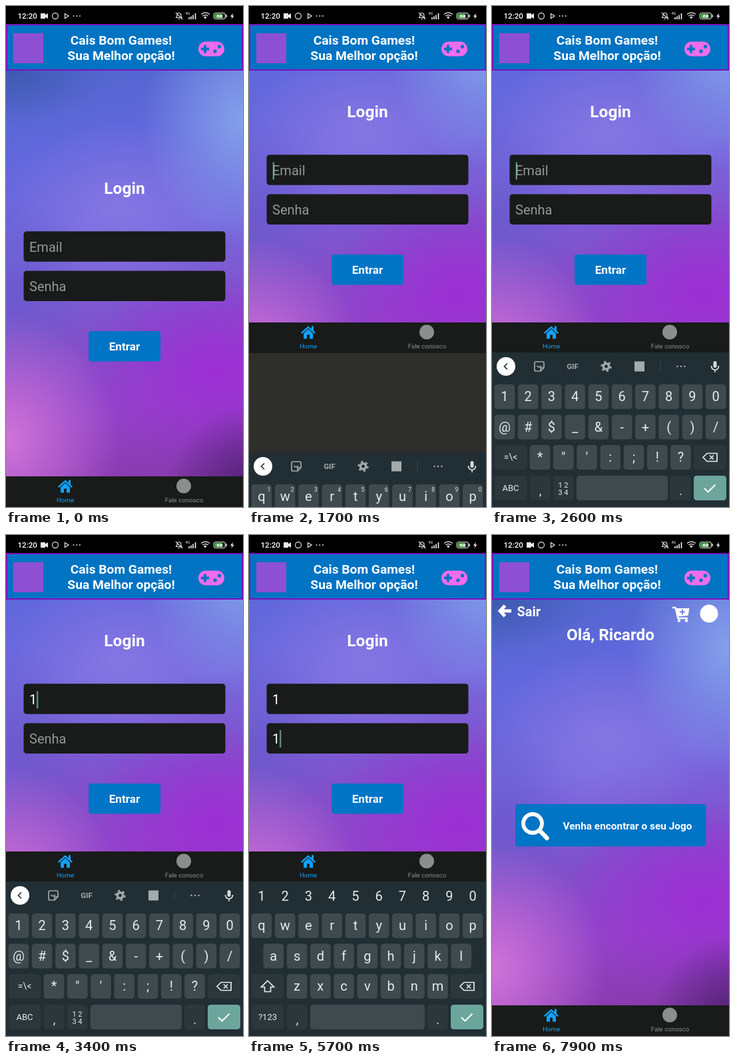
Recreate the animation shown at these times as an HTML page. Size 356x752 px, loop 8000 ms.

```html
<!DOCTYPE html>
<html lang="pt-BR">
<head>
<meta charset="utf-8">
<title>Login</title>
<style>
html, body { margin: 0; width: 100%; height: 100%; overflow: hidden; background: #2e2e2b; }
svg { position: absolute; left: 0; display: block; overflow: visible; }
text { font-family: Roboto, "Noto Sans", sans-serif; fill: #fff; }
.b { font-weight: 700; }
.m { text-anchor: middle; }
.stage { position: absolute; left: 0; top: 0; width: 356px; height: 752px; overflow: hidden; }
.stage, .stage * { animation-duration: 8s; animation-timing-function: step-end; animation-iteration-count: infinite; }

.clip { position: absolute; top: 27px; width: 356px; height: 679px; overflow: hidden; animation-name: clip; }
.page { position: absolute; inset: 0; }
.login { animation-name: login; }
.home { opacity: 0; animation-name: home; }
.bg { position: absolute; top: 70px; left: 0; right: 0; bottom: 0; overflow: hidden; }
.bg::before {
  content: ""; position: absolute; left: 0; width: 100%; height: 609px; top: calc(50% - 304.5px);
  background:
    radial-gradient(150px 80px at 0 0, #3a56a8cc, #3a56a800),
    radial-gradient(150px 190px at 100% 12%, #84a0ea, #84a0ea00),
    radial-gradient(130px 130px at 104% 104%, #4c2070, #4c207000),
    radial-gradient(170px 190px at 0 91%, #cf74d8, #cf74d800),
    radial-gradient(200px 150px at 88% 74%, #9c2ed4, #9c2ed400),
    radial-gradient(110px 150px at 4% 55%, #6656c8aa, #6656c800),
    radial-gradient(170px 130px at 48% 34%, #8d7ae4bb, #8d7ae400),
    linear-gradient(168deg, #4f66cc, #6268dc 20%, #7669de 42%, #824fca 63%, #9244c8 80%, #8638a8);
}
.form { top: calc(50% + 34.5px); }
.ph, .ph text { fill: #969998; }
.cur { fill: #74aea3; opacity: 0; }
.c1 { animation-name: cur1; }
.c2 { animation-name: cur2; }
.ph1 { animation-name: ph1; }
.v1 { opacity: 0; animation-name: v1; }
.ph2 { animation-name: ph2; }
.v2 { opacity: 0; animation-name: v2; }
.dot { opacity: 0; fill: #fff; animation-name: dot; }
.btn { animation-name: press; }

.tabs { top: 0; transform: translateY(706px); animation-name: tabs; }
.kb { top: 520px; transform: translateY(232px); animation-name: kb; }
.kb text { fill: #e6ebec; }
.k { fill: #3e4a4e; }
.d { fill: #2b373b; }
.bar { animation-name: early; }
.pass { opacity: 0; animation-name: late; }
.abc { animation-name: abc; }
.hint { animation-name: hint; }
.sym { opacity: 0; animation-name: sym; }
.st { top: 0; }

@keyframes clip { 0% { height: 679px } 21.25% { height: 448px } 87.5% { height: 679px } }
@keyframes tabs { 0% { transform: translateY(706px) } 21.25% { transform: translateY(475px) } 86.25% { transform: translateY(706px) } }
@keyframes kb {
  0% { transform: translateY(232px) } 21.25% { transform: translateY(150px) }
  22.5% { transform: translateY(38px) } 23.75% { transform: none }
  86.25% { transform: translateY(5px) } 87.5% { transform: translateY(90px) }
  88.75% { transform: translateY(200px) } 90% { transform: translateY(232px) }
}
@keyframes login { 0% { transform: none } 85% { transform: scale(1.03) } 86.25% { transform: scale(1.076) } 87.5% { transform: scale(1.09) } }
@keyframes home {
  0% { opacity: 0; transform: none } 87.5% { opacity: .85; transform: scale(.975) }
  88.75% { opacity: 1; transform: scale(.993) } 90% { opacity: 1; transform: none }
}
@keyframes cur1 {
  0% { opacity: 0; transform: none } 21.25% { opacity: 1; transform: none } 26.25% { opacity: 0; transform: none }
  32.5% { opacity: 1; transform: none } 38.75% { opacity: 1; transform: translateX(10.4px) } 45% { opacity: 0; transform: none }
}
@keyframes cur2 {
  0% { opacity: 0; transform: none } 48.75% { opacity: 1; transform: none } 55% { opacity: 0; transform: none }
  58.75% { opacity: 1; transform: translateX(10.4px) } 65% { opacity: 0; transform: none }
  71.25% { opacity: 1; transform: translateX(10.4px) } 77.5% { opacity: 0; transform: none }
}
@keyframes ph1 { 0% { opacity: 1 } 38.75% { opacity: 0 } }
@keyframes v1 { 0% { opacity: 0 } 38.75% { opacity: 1 } }
@keyframes ph2 { 0% { opacity: 1 } 58.75% { opacity: 0 } }
@keyframes v2 { 0% { opacity: 0 } 58.75% { opacity: 1 } 77.5% { opacity: 0 } }
@keyframes dot { 0% { opacity: 0 } 77.5% { opacity: 1 } }
@keyframes press { 0% { opacity: 1 } 80% { opacity: .5 } 81.25% { opacity: .2 } 83.75% { opacity: .4 } 85% { opacity: .6 } 86.25% { opacity: .8 } }
@keyframes early { 0% { opacity: 1 } 50% { opacity: 0 } }
@keyframes late { 0% { opacity: 0 } 50% { opacity: 1 } }
@keyframes abc { 0% { opacity: 1 } 31.25% { opacity: 0 } 50% { opacity: 1 } }
@keyframes hint { 0% { opacity: 1 } 31.25% { opacity: 0 } }
@keyframes sym { 0% { opacity: 0 } 31.25% { opacity: 1 } 50% { opacity: 0 } }
</style>
</head>
<body>
<svg width="0" height="0">
  <defs>
    <g id="header">
      <rect y="27" width="356" height="70" fill="#7d10bd"/>
      <rect x="2" y="29" width="352" height="66" fill="#0073c3"/>
      <rect x="11" y="41" width="45" height="45" fill="#8e50d2"/>
      <text class="b m" x="173" y="58" font-size="19.200">Cais Bom Games!</text>
      <text class="b m" x="173" y="80.700" font-size="19.200">Sua Melhor opção!</text>
      <rect x="289" y="53.500" width="39" height="22" rx="11" fill="#ef6cec"/>
      <path d="M293 64.500h12M299 58.500v12" stroke="#0073c3" stroke-width="4"/>
      <circle cx="314" cy="68" r="2.700" fill="#0073c3"/>
      <circle cx="320.500" cy="61" r="2.700" fill="#0073c3"/>
    </g>
  </defs>
</svg>

<div class="stage">
  <svg class="tabs" width="356" height="46">
    <rect width="356" height="46" fill="#181b19"/>
    <g fill="#14a0ff">
      <path d="M79.500 15.500 89 7l9.500 8.500" fill="none" stroke="#14a0ff" stroke-width="2.400" stroke-linecap="round"/>
      <path d="M94 5.500h3v7h-3zM82 16.500l7-6.500 7 6.500v8h-5v-6h-4v6h-5z"/>
    </g>
    <circle cx="267" cy="14.500" r="11" fill="#8c8e8d"/>
    <text class="m" x="89" y="38.700" font-size="9.700" style="fill:#14a0ff">Home</text>
    <text class="m" x="267.500" y="38.700" font-size="9.700" style="fill:#8c8e8d">Fale conosco</text>
  </svg>

  <div class="clip">
    <div class="page login">
      <div class="bg"></div>
      <svg width="356" height="679" viewBox="0 27 356 679"><use href="#header"/></svg>
      <svg class="form" width="356" height="1">
        <text class="b m" x="178" y="-119" font-size="24.500">Login</text>
        <rect x="26.500" y="-62.800" width="303" height="45.500" rx="4.500" fill="#181b19"/>
        <rect x="26.500" y="-3.500" width="303" height="45.500" rx="4.500" fill="#181b19"/>
        <g font-size="20">
          <text class="ph ph1" x="35" y="-32.500">Email</text>
          <text class="v1" x="35" y="-32.500">1</text>
          <text class="ph ph2" x="35" y="26.500">Senha</text>
          <text class="v2" x="35" y="26.500">1</text>
        </g>
        <circle class="dot" cx="38.700" cy="19.500" r="2.500"/>
        <rect class="cur c1" x="35.800" y="-51.500" width="1.900" height="26"/>
        <rect class="cur c2" x="35.800" y="7" width="1.900" height="26"/>
        <g class="btn">
          <rect x="124" y="87" width="108" height="45.500" rx="4" fill="#0074c5"/>
          <text class="b m" x="178" y="116.300" font-size="17.200">Entrar</text>
        </g>
      </svg>
    </div>
    <div class="page home">
      <div class="bg"></div>
      <svg width="356" height="679" viewBox="0 27 356 679">
        <use href="#header"/>
        <path d="M19.500 106l-7.500 8 7.500 8M12 114h17" fill="none" stroke="#fff" stroke-width="4.800"/>
        <text class="b" x="37.500" y="122" font-size="19.900">Sair</text>
        <path d="M271 109h4.500l4 16H294" fill="none" stroke="#fff" stroke-width="2.400"/>
        <path d="M276 110h20.500l-2 11-16 1.500z" fill="#fff"/>
        <path d="M282 115.500h8M286 111.500v8" stroke="#6f84da" stroke-width="2"/>
        <circle cx="281" cy="128.500" r="2.200" fill="#fff"/>
        <circle cx="292" cy="128.500" r="2.200" fill="#fff"/>
        <circle cx="326" cy="118" r="13.500" fill="#fff"/>
        <text class="b m" x="178" y="157.500" font-size="24.300">Olá, Ricardo</text>
        <rect x="35" y="404" width="286.500" height="63.500" rx="4" fill="#0074c5"/>
        <circle cx="61" cy="433" r="14" fill="none" stroke="#fff" stroke-width="5.800"/>
        <path d="M72 444l10.500 11" stroke="#fff" stroke-width="6.500" stroke-linecap="round"/>
        <text class="b" x="106.500" y="441.500" font-size="15.400">Venha encontrar o seu Jogo</text>
      </svg>
    </div>
  </div>

  <svg class="kb" width="356" height="232">
    <rect width="356" height="232" fill="#212e33"/>
    <g class="bar" fill="none" stroke="#a3abad" stroke-width="1.700">
      <circle cx="21" cy="21" r="14" fill="#fff" stroke="none"/>
      <path d="M23 16.500l-4.500 4.500 4.500 4.500" stroke="#212e33"/>
      <path d="M66 14h10q2 0 2 2v7l-5 5h-7q-2 0-2-2v-10q0-2 2-2zM78 23h-5v5M67.500 20q3 4 6.500 0"/>
      <text class="b m" x="121" y="25.200" font-size="11.500" stroke="none" style="fill:#a3abad">GIF</text>
      <circle cx="171.500" cy="21" r="4.200" stroke-width="3.400"/>
      <circle cx="171.500" cy="21" r="7" stroke-width="2.400" stroke-dasharray="3.200 4.130"/>
      <rect x="214" y="13.500" width="15" height="15" fill="#a3abad" stroke="none"/>
      <path d="M253 13v16" stroke="#3a464a" stroke-width="1"/>
      <path d="M278.500 21h12" stroke-width="2.600" stroke-linecap="round" stroke-dasharray="0 5.500"/>
      <rect x="332.500" y="13" width="5" height="10" rx="2.500" fill="#d5dadb" stroke="none"/>
      <path d="M329.500 20q0 6 5.500 6t5.500-6M335 26v4" stroke="#d5dadb"/>
    </g>
    <g id="keys"></g>
    <rect class="d" x="303" y="139" width="49" height="37" rx="4.500"/>
    <path d="M323 151.500h15v12h-15l-6-6zM327 154.500l6 6m0-6l-6 6" fill="none" stroke="#e6ebec" stroke-width="1.700"/>
    <rect x="303" y="185" width="49" height="37" rx="4.500" fill="#6ba59b"/>
    <path d="M319 204l5.500 5.500 11-11" fill="none" stroke="#fff" stroke-width="2.200"/>
  </svg>

  <svg class="st" width="356" height="27">
    <rect width="356" height="27"/>
    <text x="17.500" y="18.700" font-size="11.600" font-weight="500">12:20</text>
    <path d="M52 11h7v2.500l4-2.500v8l-4-2.500V19h-7z" fill="#eee"/>
    <circle cx="74" cy="15" r="4.500" fill="none" stroke="#ccc" stroke-width="1.300"/>
    <path d="M88.500 11.500l5.500 3.500-5.500 3.500z" fill="none" stroke="#ddd" stroke-width="1.300"/>
    <path d="M101.500 15h12" stroke="#ddd" stroke-width="2" stroke-linecap="round" stroke-dasharray="0 4.700"/>
    <g fill="none" stroke="#ddd" stroke-width="1.200">
      <path d="M255.500 17.500h8.500l-1.200-2v-2q0-3-3-3t-3 3v2zM258.500 19.500h2.500M255 10l10 10"/>
      <path d="M293 12.500q6.500-5 13 0M295.300 15q4.200-3 8.400 0" stroke-width="1.500"/>
    </g>
    <text x="269.500" y="13" font-size="5.500">4G</text>
    <path d="M275 20v-3M278 20v-4.500M281 20v-6.500M284.500 20v-9" stroke="#eee" stroke-width="1.700"/>
    <path d="M297 16.500q2-1.300 4.500 0l-2.200 3z" fill="#eee"/>
    <rect x="312" y="10.500" width="17.500" height="9" rx="2.500" fill="#1b2b1b" stroke="#ddd"/>
    <rect x="313.500" y="12" width="11" height="6" rx="1" fill="#45b54a"/>
    <rect x="330.500" y="13" width="1.500" height="4" fill="#ddd"/>
    <text class="b m" x="321" y="18" font-size="8">68</text>
    <path d="M341 10.500l-4 5.500h2.500l-1 4 4-5.500H340z" fill="#eee"/>
  </svg>
</div>

<script>
const PITCH = 35.25, FIRST = 18.9, TOPS = [48, 93.5, 139, 185];
const esc = s => s.replace(/&/g, "&amp;").replace(/</g, "&lt;");
const label = (x, y, s, size = 20) => `<text class="m" x="${x}" y="${y}" font-size="${size}">${esc(s)}</text>`;
const box = (x, row, w, cls = "k") => `<rect class="${cls}" x="${x}" y="${TOPS[row]}" width="${w}" height="37" rx="4.500"/>`;
const key = (x, row, s) => box(x - 15.3, row, 30.6) + label(x, TOPS[row] + 25.3, s);
const keys = (s, row, x0) => [...s].map((c, i) => key(x0 + i * PITCH, row, c)).join("");
const digits = (y, dx, size) => [..."1234567890"].map((c, i) => label(FIRST + dx + i * PITCH, y, c, size)).join("");
const group = (cls, s) => `<g class="${cls}">${s}</g>`;
const wide = (row, s, size) => box(4, row, 48.5, "d") + label(28, TOPS[row] + 23, s, size);
const shift = `<path d="M28 149l9.500 9.500h-5v7h-9v-7h-5z" fill="none" stroke="#e6ebec" stroke-width="1.700"/>`;

document.getElementById("keys").innerHTML =
  box(57, 3, 30.5, "d") + label(72.5, 214, ",", 18) +
  box(268, 3, 30.5, "d") + label(283.5, 214, ".", 18) +
  group("bar", box(92, 3, 30.5, "d") + box(127, 3, 137)) +
  group("pass", box(92, 3, 172) + digits(29, 0, 20)) +
  group("abc", keys("qwertyuiop", 0, FIRST) + keys("asdfghjkl", 1, 36.8) +
    box(4, 2, 48.5, "d") + shift + keys("zxcvbnm", 2, 72) + wide(3, "?123", 13)) +
  group("hint", digits(58.5, 11, 8.5)) +
  group("sym", keys("1234567890", 0, FIRST) + keys("@#$_&-+()/", 1, FIRST) +
    wide(2, "=\\<", 14) + keys("*\"':;!?", 2, 72) + wide(3, "ABC", 13) +
    label(107, 202.5, "1 2", 11) + label(107, 214, "3 4", 11));
</script>
</body>
</html>
```
